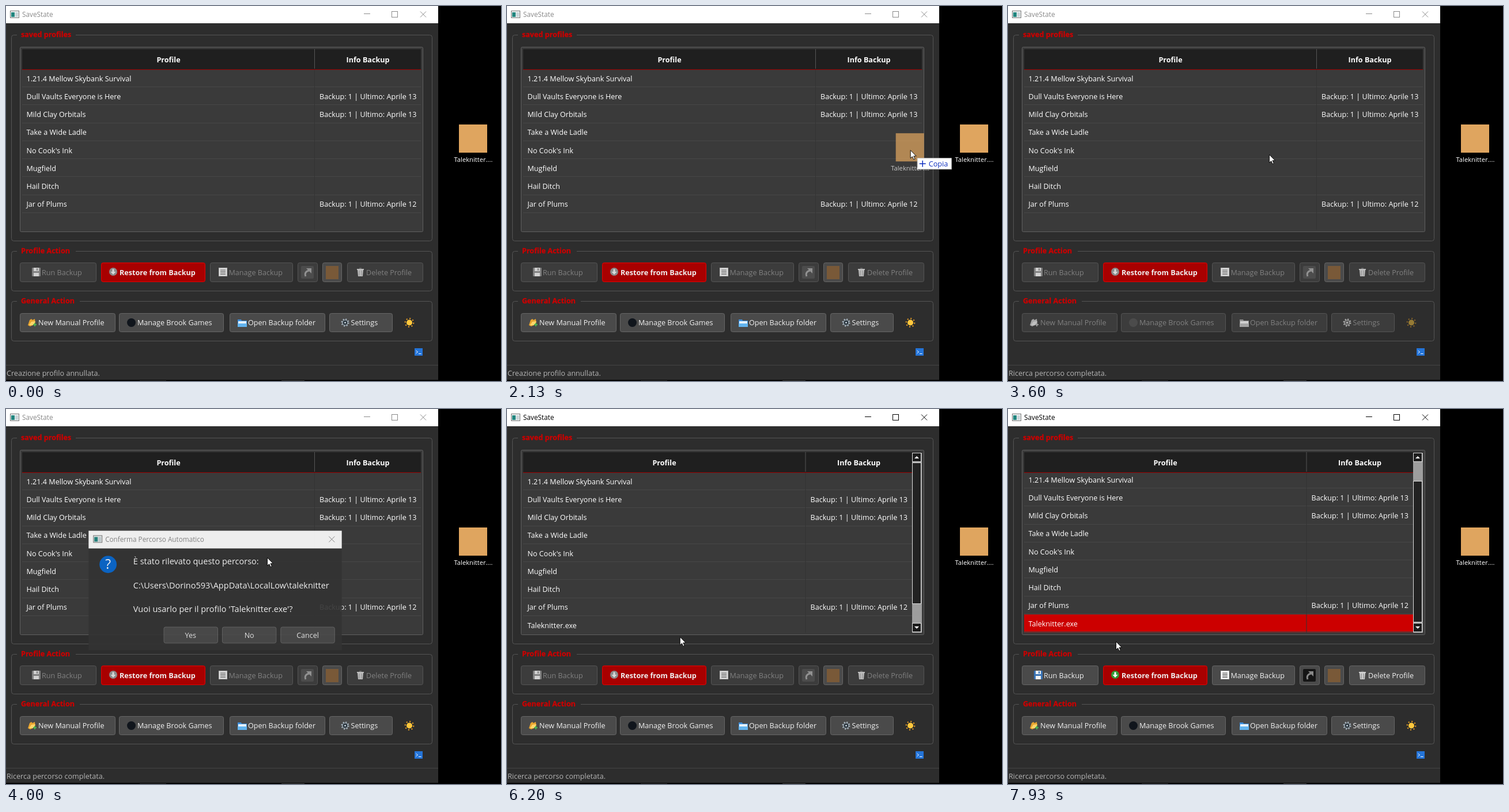
Recreate the animation shown at these times as an HTML page. Size 859 px wide and 652 px high, loop 8000 ms.

```html
<!DOCTYPE html>
<html lang="it">
<head>
<meta charset="utf-8">
<title>SaveState</title>
<style>
html, body { margin: 0; width: 100%; height: 100%; overflow: hidden; background: #000; }
svg { display: block; width: 859px; height: 652px; }
text { font: 500 12.6px "Open Sans", "Noto Sans", sans-serif; fill: #fff; white-space: pre; }
.b { font-weight: 700; }
.mid { text-anchor: middle; }
.small { font-size: 11.8px; font-weight: 400; }
.msg { font-size: 14.6px; }
.label { font-size: 11.2px; }
.group { fill: none; stroke: #555; }
.heading { fill: #cc0000; stroke: #cc0000; stroke-width: .3; }
.btn > rect { fill: #4a4a4a; stroke: #666; }
.btn > text { fill: #f0f0f0; }
.btn.red > rect { fill: #a80000; stroke: #e60000; }
.off .btn:not(.red) > rect { fill: #3c3c3c; stroke: #555; }
.off .btn:not(.red) > text { fill: #808080; }
.off .icon { filter: grayscale(1) contrast(.55) brightness(1.1); }
.off .sun { opacity: .5; }
.grid { stroke: #474747; }
.chrome { --ink: #000; }
.chrome.idle { --ink: #8a8a8a; }
.chrome text { fill: var(--ink); }
.line { fill: none; stroke: var(--ink); }
#yes.hot rect { stroke: #c8c8c8; }
</style>
</head>
<body>
<script>
const text = (x, y, s, cls = "") => `<text x="${x}" y="${y}" class="${cls}">${s}</text>`;
const rect = (x, y, w, h, extra = "") => `<rect x="${x}" y="${y}" width="${w}" height="${h}" ${extra}/>`;
const path = (d, extra = "") => `<path d="${d}" ${extra}/>`;
const g = (inner, extra = "") => `<g ${extra}>${inner}</g>`;
const at = (x, y, inner, cls = "icon") => g(g(inner, `class="${cls}"`), `transform="translate(${x} ${y})"`);

const icons = {
  floppy: rect(0, 0, 15, 15, 'rx="1" fill="#3973b5"') + rect(3, 0, 9, 6, 'fill="#e8eef4"') +
    rect(8, 1, 2, 4, 'fill="#3973b5"') + rect(3, 9, 9, 6, 'fill="#f2f2f2"'),
  down: '<circle cx="7" cy="7" r="7" fill="#319b36"/>' +
    path("M5.5 2.5h3v4.500h3L7 12 2.500 7h3z", 'fill="#fff"'),
  list: rect(.5, .5, 14, 14, 'fill="#fff" stroke="#ccc"') +
    path("M3 4h9M3 6.500h9M3 9h9M3 11.500h9", 'stroke="#333"'),
  bin: path("M1 2h12v2H1zM2 4h10l-1 11H3z", 'fill="#cfcfcf"') +
    path("M5 5v9M9 5v9M5 1h4", 'stroke="#777"'),
  link: rect(0, 0, 22, 22, 'rx="2" fill="#151515"') +
    path("M8 18c-2-5 0-9 6-10", 'fill="none" stroke="#888" stroke-width="3"') +
    path("M9 4h9v9z", 'fill="#888"'),
  block: rect(0, 0, 22, 23, 'fill="#795938"'),
  manual: path("M0 12L3 3l3-2 2 2 4-2 1 9-9 4z", 'fill="#e9a52f"') +
    path("M2 12l4-6 7-1-3 7z", 'fill="#ffd66b"') +
    path("M9 11h6M12 8v6", 'stroke="#4caf50" stroke-width="2"'),
  disc: '<circle cx="7.500" cy="7.500" r="7.500" fill="#10151c"/>',
  folder: path("M0 1h6l1 2h9v11H0z", 'fill="#3a8ddb"') + rect(1, 4, 14, 4, 'fill="#e6f2fb"') +
    rect(0, 8, 16, 6, 'fill="#62b4ef"'),
  gear: '<circle cx="7.500" cy="7.500" r="6" fill="none" stroke="#a9b8c3" stroke-width="2" stroke-dasharray="2.200 2.510"/>' +
    '<circle cx="7.500" cy="7.500" r="4.500" fill="#28323a" stroke="#a9b8c3" stroke-width="1.200"/>' +
    '<circle cx="7.500" cy="7.500" r="1.500" fill="#c5d3dd"/>',
  sun: '<circle r="5" fill="#ffc83d"/>' +
    '<circle r="7.300" fill="none" stroke="#f5a623" stroke-width="2" stroke-dasharray="2 3.730"/>',
  app: rect(.5, .5, 15, 12, 'fill="#eef3f3" stroke="#777"') + rect(2, 3, 6, 8, 'fill="#23867f"') +
    rect(9, 3, 5, 8, 'fill="#c9d4d8"'),
};

function button(x, y, w, h, label, tx, icon = "", cls = "", id = "") {
  return g(rect(x + .5, y + .5, w - 1, h - 1, 'rx="3"') + icon +
    text(tx, y + h / 2 + 4.8, label, cls), `class="btn ${cls === "b" ? "red" : ""}" ${id}`);
}

function groupBox(y, h, title, width) {
  return rect(9.5, y + .5, 730, h, 'rx="4" class="group"') +
    rect(19, y - 2, width, 6, 'fill="#2d2d2d"') + text(26, y + 4, title, "heading b");
}

const rows = [
  ["1.21.4 Mellow Skybank Survival"], ["Dull Vaults Everyone is Here", 13],
  ["Mild Clay Orbitals", 13], ["Take a Wide Ladle"], ["No Cook's Ink"],
  ["Mugfield"], ["Hail Ditch"], ["Jar of Plums", 12], ["Taleknitter.exe"],
];
const pitch = 31.22, rowTop = 110;

const tableRows = rows.map(([name, day], i) => {
  const y = rowTop + i * pitch, isNew = i === rows.length - 1;
  return g((isNew ? rect(28, y + .5, 692, pitch, 'id="selection" fill="#cc0000"') : "") +
    text(35.5, y + 20.8, name) +
    (day ? g(text(544, y + 20.8, `Backup: 1 | Ultimo: Aprile ${day}`), 'class="col"') : "") +
    path(`M28 ${Math.round(y + pitch) - .5}H720`, 'class="grid"'), isNew ? 'id="newRow"' : "");
}).join("");

const scrollbar = g(
  rect(703, 76, 17, 313, 'fill="url(#hatch)"') +
  rect(703.5, 76.5, 15, 15, 'fill="#1c1c1c" stroke="#ddd"') + path("M707 86h8l-4-4z", 'fill="#fff"') +
  rect(703.5, 372.5, 15, 15, 'fill="#1c1c1c" stroke="#ddd"') + path("M707 378h8l-4 4z", 'fill="#fff"') +
  rect(703.5, 93.5, 15, 245, 'id="thumb" fill="#222" stroke="#ddd"'), 'id="scrollbar"');

const table = rect(24.5, 71.5, 699, 321, 'rx="2" fill="#3a3a3a" stroke="#606060"') +
  g(g(tableRows, 'id="rows"'), 'clip-path="url(#body)"') +
  rect(28, 75, 692, 35, 'fill="#1f1f1f"') +
  g(text(282, 98, "Profile", "b mid"), 'id="head"') +
  g(text(628, 98, "Info Backup", "b mid") + path("M535.500 75v34", 'stroke="#555"') +
    path("M535.500 111v278", 'stroke="#333"'), 'class="col"') +
  rect(28, 110, 692, 1, 'fill="#9a0000"') + scrollbar;

const profileButtons = g(
  button(24, 446, 133, 34, "Run Backup", 62, at(45, 455, icons.floppy)) +
  button(165, 446, 181, 34, "Restore from Backup", 197, at(179, 455, icons.down), "b") +
  button(354, 446, 144, 34, "Manage Backup", 386.5, at(369, 455, icons.list)) +
  button(506, 446, 35, 34, "", 0, at(512, 452, icons.link)) +
  button(592, 446, 132, 34, "Delete Profile", 625, at(608, 455, icons.bin)), 'id="profileButtons"') +
  button(549, 446, 34, 34, "", 0, at(555, 452, icons.block));

const generalButtons = g(
  button(24, 534, 166, 33, "New Manual Profile", 56, at(38, 543, icons.manual)) +
  button(196, 534, 182, 33, "Manage Brook Games", 228, at(210, 543, icons.disc)) +
  button(388, 534, 166, 33, "Open Backup folder", 420, at(402, 544, icons.folder)) +
  button(561, 534, 110, 33, "Settings", 598.5, at(581, 543, icons.gear)) +
  at(700, 550.5, icons.sun, "sun"), 'id="generalButtons"');

const cross = (x, y) => path(`M${x} ${y}l10 10m0-10l-10 10`, 'class="line"');

const mainWindow = rect(0, 0, 750, 650, 'fill="#2d2d2d"') + rect(0, 0, 750, 30, 'fill="#fff"') +
  at(7, 8, icons.app) +
  g(text(28, 19, "SaveState", "small") + path("M621 13.500h11", 'class="line"') +
    rect(669.5, 9.5, 10, 10, 'class="line"') + cross(719, 9.5), 'id="chrome" class="chrome"') +
  groupBox(50, 358, "saved profiles", 102) + table +
  groupBox(426, 69, "Profile Action", 102) + profileButtons +
  groupBox(513, 69, "General Action", 109) + generalButtons +
  rect(709, 595, 14, 13, 'fill="#2474d8"') +
  path("M711.500 599l3 2.500-3 2.500M716 604.500h4.500", 'fill="none" stroke="#fff"') +
  path("M0 624.500h750", 'stroke="#454545"') +
  '<text id="status" x="1" y="643" style="fill:#b4b4b4"></text>' +
  rect(232, 651, 46, 1, 'fill="#2c2c2c"') + rect(478, 651, 40, 1, 'fill="#444"');

const dialog = g(
  rect(142, 211, 442, 209, 'fill="#333"') + rect(142, 211, 442, 31, 'fill="#fff"') +
  at(150, 219, icons.app) +
  g(text(171, 230.500, "Conferma Percorso Automatico", "small") + cross(561.5, 221), 'id="dialogChrome" class="chrome"') +
  '<circle cx="176" cy="270" r="15" fill="#0767cf"/>' +
  '<text x="176" y="278" class="mid" style="font-size:23px">?</text>' +
  text(220, 270, "È stato rilevato questo percorso:", "msg") +
  text(220, 311.500, "C:\\Users\\Dorino593\\AppData\\LocalLow\\taleknitter", "msg") +
  text(220, 353, "Vuoi usarlo per il profilo 'Taleknitter.exe'?", "msg") +
  button(273, 379, 95, 29, "Yes", 320, "", "mid", 'id="yes"') +
  button(375, 379, 95, 29, "No", 422.5, "", "mid") +
  button(477, 379, 95, 29, "Cancel", 524.5, "", "mid"), 'id="dialog"');

const shortcut = rect(786, 206, 49, 49, 'fill="#dfa55f"') + text(811, 271, "Taleknitter....", "label mid");

const pointer = g(
  g(g(shortcut, 'transform="translate(-811 -235)" opacity=".72"') +
    rect(12.5, 14.5, 59, 19, 'fill="#fff" stroke="#ccc"') +
    path("M16 24h11M21.500 18.500v11", 'stroke="#1030c0" stroke-width="1.500"') +
    '<text x="32" y="29" style="fill:#1030c0">Copia</text>', 'id="ghost"') +
  path("M.5 .5v14l3.200-3 2.300 5 2.300-1-2.300-4.800h4.500z", 'fill="#fff" stroke="#000" stroke-width=".9"'), 'id="pointer"');

document.body.innerHTML = `<svg viewBox="0 0 859 652"><defs>
  <clipPath id="body">${rect(28, 110, 692, 279)}</clipPath>
  <pattern id="hatch" width="2" height="2" patternUnits="userSpaceOnUse">
    ${rect(0, 0, 2, 2, 'fill="#777"') + rect(0, 0, 1, 1, 'fill="#c4c4c4"') + rect(1, 1, 1, 1, 'fill="#c4c4c4"')}
  </pattern></defs>
  ${rect(0, 0, 859, 652)}${mainWindow}
  ${rect(773.5, 204.5, 75, 72, 'id="hover" fill="#fff" fill-opacity=".13" stroke="#fff" stroke-opacity=".25"')}
  ${shortcut}${dialog}${pointer}</svg>`;

const $ = id => document.getElementById(id);
const show = (id, on) => { $(id).style.display = on ? "" : "none"; };
const clamp = v => Math.min(1, Math.max(0, v));
const move = (el, x, y = 0) => el.setAttribute("transform", `translate(${x} ${y})`);

// time, x, y of the pointer tip
const track = [
  [1270, 862, 300], [1660, 811, 236], [1840, 811, 235], [2470, 570, 268], [2730, 459, 263],
  [2870, 453, 258], [4070, 453, 258], [4540, 365, 332], [4900, 330, 394], [6050, 330, 394],
  [6200, 300, 396], [6550, 215, 372], [7730, 200, 380], [7930, 187, 404], [8000, 187, 404],
];

function pointerAt(t) {
  const i = Math.max(1, track.findIndex(k => k[0] >= t));
  const [t0, x0, y0] = track[i - 1], [t1, x1, y1] = track[i];
  const u = clamp((t - t0) / (t1 - t0));
  return [x0 + (x1 - x0) * u, y0 + (y1 - y0) * u];
}

function draw(t) {
  const during = (a, b) => t >= a && t < b;
  show("pointer", t >= 1270);
  move($("pointer"), ...pointerAt(t));
  show("ghost", during(1860, 2800));
  show("hover", during(1480, 2000));

  $("status").textContent = t < 3270 ? "Creazione profilo annullata." : "Ricerca percorso completata.";
  $("generalButtons").classList.toggle("off", during(2870, 3800));
  $("profileButtons").classList.toggle("off", t < 6600);
  $("chrome").classList.toggle("idle", t < 5800);

  show("dialog", during(3800, 5870));
  const opening = 1 - (1 - clamp((t - 3800) / 320)) ** 2.5;
  const closing = clamp((t - 5725) / 145);
  const scale = (.93 + .07 * opening) * (1 - .05 * closing);
  $("dialog").setAttribute("opacity", opening * (1 - closing));
  $("dialog").setAttribute("transform", `translate(363 315) scale(${scale}) translate(-363 -315)`);
  $("dialogChrome").classList.toggle("idle", t < 4070);
  $("yes").classList.toggle("hot", t >= 4840);

  const added = t >= 5800, scrolled = t >= 7060;
  show("newRow", added);
  show("scrollbar", added);
  show("selection", t >= 6600);
  document.querySelectorAll(".col").forEach(el => move(el, added ? -17.5 : 0));
  move($("head"), added ? -9 : 0);
  move($("rows"), 0, scrolled ? -3 : 0);
  move($("thumb"), 0, scrolled ? 32 : 0);
}

const start = performance.now();
function tick() {
  draw((performance.now() - start) % 8000);
  requestAnimationFrame(tick);
}
tick();
</script>
</body>
</html>
```
